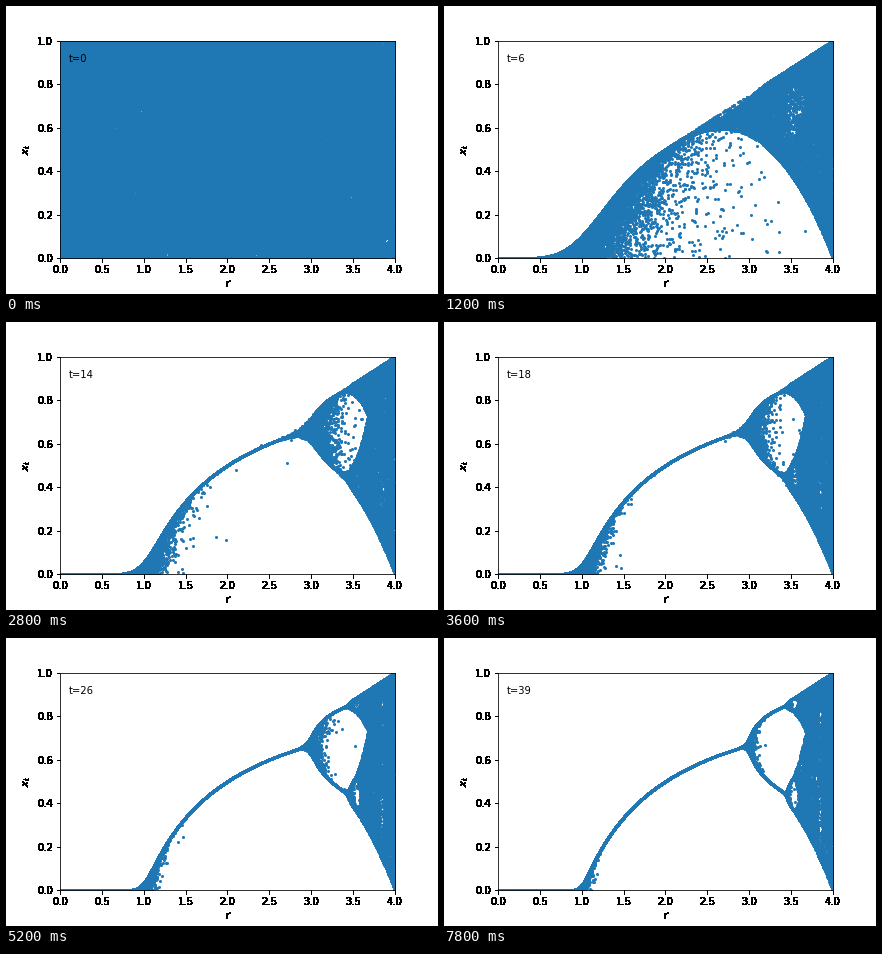
Recreate the animation shown at these times as a matplotlib script. Size 432x288 px, loop 8000 ms.

```python
import numpy as np
import matplotlib.pyplot as plt
from matplotlib.animation import FuncAnimation

STEPS = 40
POINTS = 100_000

plt.rcParams.update({"font.family": "DejaVu Sans", "font.size": 10})

rng = np.random.default_rng(0)
r = rng.uniform(0, 4, POINTS)
x0 = rng.uniform(0, 1, POINTS)


def logistic(t):
    x = x0
    for _ in range(t):
        x = r * x * (1 - x)
    return x


def harden(img, dpi):
    """Turn every inked pixel solid black, without antialiasing."""
    solid = np.zeros_like(img)
    solid[..., 3] = img[..., 3] > 0
    return solid, 0, 0


fig = plt.figure(figsize=(6, 4), dpi=72, facecolor="white")
ax = fig.add_axes([0.125, 0.125, 0.775, 0.755])
ax.set(xlim=(0, 4), ylim=(0, 1), xlabel="r", ylabel="$x_t$")
for axis in (ax.xaxis, ax.yaxis):
    axis.set_agg_filter(harden)

dots, = ax.plot(r, x0, "o", markersize=2, color="#1f77b4")
label = ax.text(0.1, 0.9, "t=0")


def update(t):
    dots.set_ydata(logistic(t))
    label.set_text(f"t={t}")
    return dots, label


anim = FuncAnimation(fig, update, frames=STEPS, interval=200,
                     repeat=True, repeat_delay=0)
plt.show()
```
